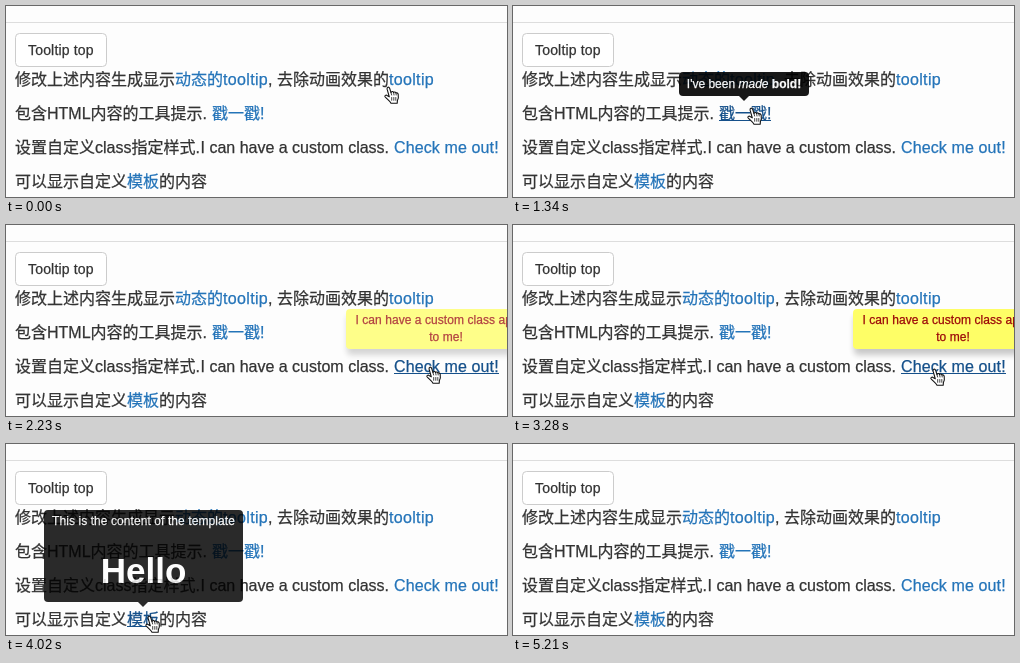
These frames come from a looping animation (501 by 191 pixels, 5480 ms). An HTML page:

```html
<!DOCTYPE html>
<html lang="zh-CN">
<head>
<meta charset="utf-8">
<title>Tooltips</title>
<style>
  html, body { margin: 0; width: 501px; height: 191px; overflow: hidden; background: #fdfdfd; }
  svg { display: block; }
  text {
    font: 16px "Liberation Sans", "Noto Sans CJK SC", "Noto Sans CJK", sans-serif;
    color: #333; fill: currentColor; stroke: currentColor; stroke-width: .25; white-space: pre;
  }
  .wide { letter-spacing: .33px; }
  .link text { color: #2474b9; }
  .link line { stroke: #15508a; visibility: hidden; }
  .link.hover text { color: #15508a; }
  .link.hover line { visibility: visible; }
  .button { font-size: 14px; letter-spacing: .18px; }
  .tip text { font-size: 12px; color: #fff; text-anchor: middle; }
  .tip .spaced { letter-spacing: .08px; }
  .tip .title { font-size: 35px; font-weight: bold; stroke: none; }
  .tip .custom { color: #900; letter-spacing: .06px; }
  .italic { font-style: italic; }
  .bold { font-weight: bold; }
</style>
</head>
<body>
<svg width="501" height="191" viewBox="0 0 501 191">
  <defs>
    <filter id="blur" x="-10%" y="-40%" width="120%" height="180%"><feGaussianBlur stdDeviation="3"/></filter>
  </defs>
  <path d="M0 16.5H501" stroke="#ddd"/>
  <rect x="9.5" y="27.5" width="91" height="33" rx="4" fill="#fff" stroke="#ccc"/>
  <text class="button" x="22" y="49">Tooltip top</text>

  <text x="9" y="79">修改上述内容生成显示</text>
  <text x="262" y="79">, 去除动画效果的</text>
  <text x="9" y="113">包含HTML内容的工具提示.</text>
  <text x="9" y="147">设置自定义class指定样式.</text>
  <text x="194.5" y="147">I can have a custom class.</text>
  <text x="9" y="181">可以显示自定义</text>
  <text x="153" y="181">的内容</text>

  <g class="link"><text x="169" y="79">动态的<tspan class="wide">tooltip</tspan></text></g>
  <g class="link" id="plain"><text class="wide" x="383" y="79">tooltip</text><line x1="383" x2="428" y1="80.5" y2="80.5"/></g>
  <g class="link" id="html"><text x="206" y="113">戳一戳!</text><line x1="206" x2="258" y1="114.5" y2="114.5"/></g>
  <g class="link" id="custom"><text x="388" y="147" letter-spacing=".12">Check me out!</text><line x1="388" x2="493" y1="148.5" y2="148.5"/></g>
  <g class="link" id="template"><text x="121" y="181">模板</text><line x1="121" x2="153" y1="182.5" y2="182.5"/></g>

  <g class="tip" id="plain-tip">
    <path d="M401 57H411L406 62Z"/>
    <rect x="356" y="33" width="100" height="24" rx="4"/>
    <text x="406" y="50">Another tooltip</text>
  </g>
  <g class="tip" id="html-tip">
    <path d="M226 90H236L231 95Z"/>
    <rect x="166" y="66" width="130" height="24" rx="4"/>
    <text x="231" y="82">I've been <tspan class="italic">made</tspan> <tspan class="bold">bold!</tspan></text>
  </g>
  <g class="tip" id="custom-tip">
    <rect x="341" y="90" width="200" height="40" rx="4" opacity=".22" filter="url(#blur)"/>
    <rect x="340" y="84" width="200" height="40" rx="4" fill="#ffff62"/>
    <text class="custom" x="440.5" y="99">I can have a custom class applied</text>
    <text class="custom" x="440" y="116">to me!</text>
  </g>
  <g class="tip" id="template-tip">
    <path d="M132 158H142L137 163Z"/>
    <rect x="38" y="66" width="199" height="92" rx="4"/>
    <text class="spaced" x="137.5" y="81">This is the content of the template</text>
    <text class="title" x="137.5" y="139">Hello</text>
  </g>

  <path id="arrow" d="M.7 .9V14.4L3.8 11.5L6.3 17.2L8.9 16.1L6.5 10.5H10.9Z" fill="#111" stroke="#fff"/>
  <g id="hand" stroke="#111" stroke-linejoin="round" stroke-linecap="round">
    <path d="M5.3 10.8L3.1 3.2C2.6 1 4.9 .3 5.6 2.2L7 6.6C7.3 5.3 9.2 5.2 9.6 6.5C10.2 5.6 11.7 5.8 12 7C13 6.4 14 7.2 14.2 8.4C14.6 10.6 14.4 12.6 13.4 14.4L13.2 17.2H7C6 15 3 13 1.2 11C.2 9.6 2 8.5 3.4 9.7Z" fill="#fff" stroke-width="1.1"/>
    <path d="M7 6.6L7.6 9M9.6 6.5L10 9M12 7L12.2 9M7.7 11.5V14.3M9.8 11.5V14.3M11.8 11.5V14.3" fill="none" stroke-width=".8"/>
  </g>
</svg>
<script>
  const LOOP = 5480;
  const LINKS = ['plain', 'html', 'custom', 'template'];
  const byId = id => document.getElementById(id);

  // start time, cursor, x, y, hovered link, open tooltip, tooltip opacity
  const STEPS = [
    [0, 'hand', 378, 80],
    [150, 'hand', 378, 80, 'plain', 'plain', .9],
    [750, 'arrow', 369, 85],
    [900, 'arrow', 305, 93],
    [1040, 'arrow', 251, 101],
    [1190, 'hand', 234, 101, 'html', 'html', .5],
    [1340, 'hand', 234, 101, 'html', 'html', .9],
    [1940, 'arrow', 270, 109, '', 'html', .5],
    [2090, 'arrow', 393, 136],
    [2230, 'hand', 420, 141, 'custom', 'custom', .74],
    [2380, 'hand', 420, 141, 'custom', 'custom', .97],
    [3280, 'hand', 417, 143, 'custom', 'custom', .97],
    [3430, 'arrow', 356, 155, '', 'custom', .97],
    [3570, 'arrow', 245, 161, '', 'custom', .3],
    [3720, 'arrow', 169, 162],
    [3870, 'arrow', 142, 170],
    [4020, 'hand', 139, 171, 'template', 'template', .83],
    [4170, 'hand', 139, 172, 'template', 'template', .9],
    [4910, 'arrow', 180, 163, '', 'template', .9],
    [5060, 'arrow', 394, 181],
    [5210, '', 0, 0]
  ];

  function draw(ms) {
    const [, cursor, x, y, hover, open, opacity] = STEPS.filter(step => step[0] <= ms).pop();
    for (const name of LINKS) {
      byId(name).classList.toggle('hover', name === hover);
      byId(name + '-tip').setAttribute('opacity', name === open ? opacity : 0);
    }
    for (const name of ['arrow', 'hand']) {
      byId(name).setAttribute('transform', `translate(${x} ${y})`);
      byId(name).setAttribute('visibility', name === cursor ? 'visible' : 'hidden');
    }
  }

  const start = performance.now();
  function tick() {
    draw((performance.now() - start) % LOOP);
    requestAnimationFrame(tick);
  }
  tick();
</script>
</body>
</html>
```
